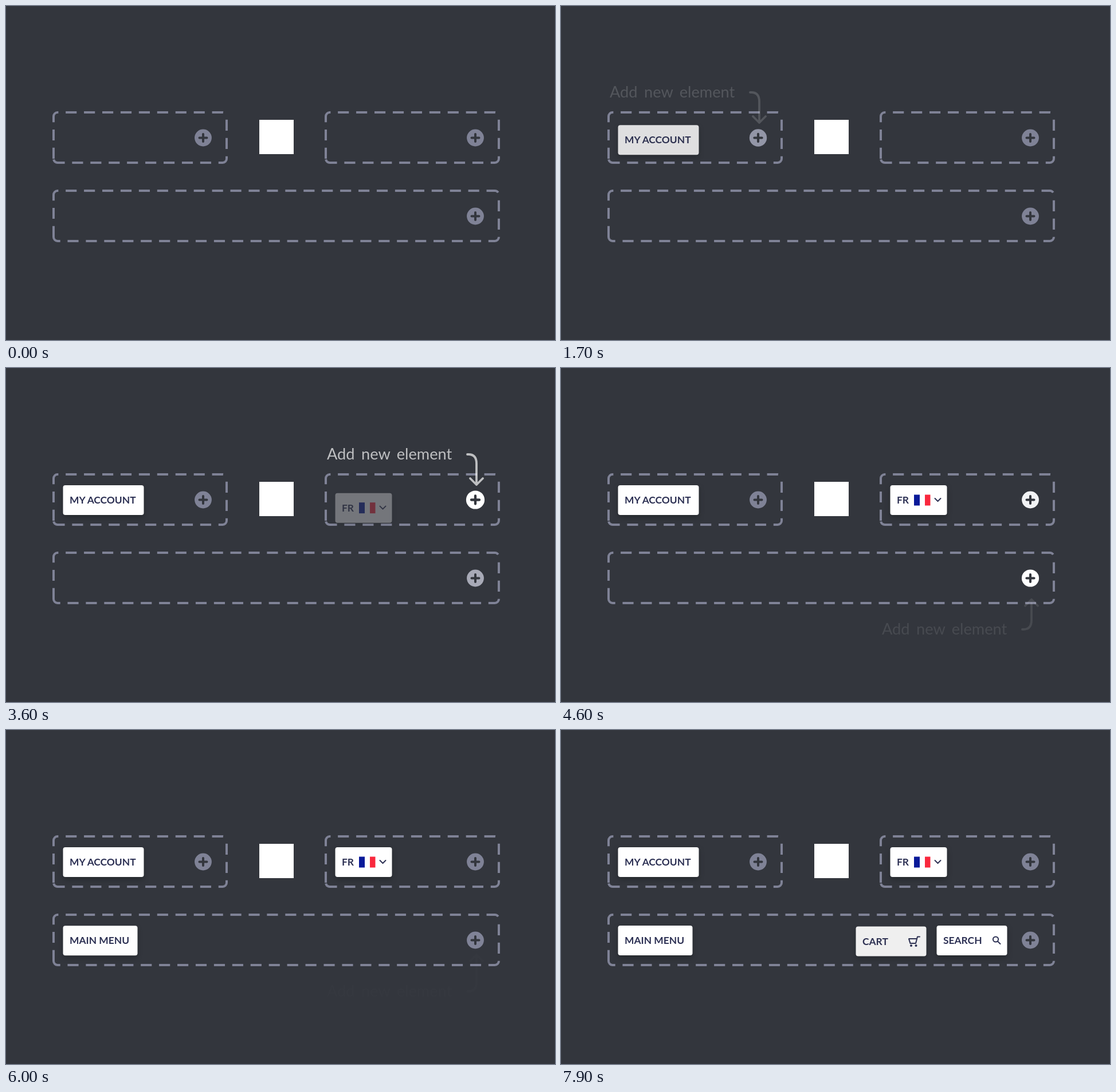
An HTML page for the animation above (8000 ms loop, 958 by 584 pixels).

```html
<!DOCTYPE html>
<html lang="en">
<head>
<meta charset="utf-8">
<title>Header builder</title>
<style>
  html, body { margin: 0; width: 100%; height: 100%; overflow: hidden; background: #33363d; }
  svg { display: block; }
  text { font-family: Lato, sans-serif; }
  /* The fill covers the inner half of the stroke, so the dashes lie outside the path. */
  .zone { fill: #33363d; stroke: #7f8296; stroke-width: 8; stroke-dasharray: 19.16 12.77; paint-order: stroke; }
  .hint text { font-size: 27.2px; word-spacing: 4.5px; fill: #fff; }
  .hint path { fill: none; stroke: #fff; stroke-width: 3.8; stroke-linecap: round; stroke-linejoin: round; }
  .cross { stroke: #33363d; stroke-width: 4; stroke-linecap: round; }
  .badge { filter: drop-shadow(0 4px 5px rgba(20, 24, 26, .45)); }
  .badge text { font-size: 17.4px; font-weight: 700; fill: #2d3154; }
  .line { fill: none; stroke: #2d3154; stroke-width: 2; stroke-linecap: round; stroke-linejoin: round; }
</style>
</head>
<body>
<svg id="stage" width="958" height="584" viewBox="0 0 958 584"></svg>
<script>
const stage = document.getElementById('stage');

function add(markup) {
  stage.insertAdjacentHTML('beforeend', markup);
  return stage.lastElementChild;
}

// Dashes run clockwise from just above the bottom left corner.
function zone(x, y, w) {
  const r = 5, h = 84, arc = (dx, dy) => `a${r} ${r} 0 0 1 ${dx} ${dy}`;
  add(`<path class="zone" d="M${x} ${y + h - r}v${2 * r - h}${arc(r, -r)}h${w - 2 * r}${arc(r, r)}` +
      `v${h - 2 * r}${arc(-r, r)}h${2 * r - w}${arc(-r, -r)}"/>`);
}

function plus(x, y) {
  const group = add(`<g><circle r="14.9"/><path class="cross" d="M-6.5 0h13M0 -6.5v13"/></g>`);
  return (lit, grow) => {
    const mix = from => Math.round(from + (255 - from) * lit);
    group.firstElementChild.setAttribute('fill', `rgb(${mix(127)},${mix(130)},${mix(150)})`);
    group.setAttribute('transform', `translate(${x} ${y}) scale(${1 + 0.12 * grow})`);
  };
}

// dir is 1 for an arrow pointing down and -1 for one pointing up.
function hint(x, baseline, tailY, tipY, dir, slide) {
  const group = add(`<g class="hint"><text x="${x}" y="${baseline}">Add new element</text><path/></g>`);
  const arrow = group.lastElementChild, ax = x + 261, bendY = tailY + 16 * dir;
  return (enter, leave) => {
    let tip = tipY - dir * slide * (1 - enter);
    if ((tip - bendY) * dir < 1) tip = bendY + dir;
    arrow.setAttribute('d', `M${ax - 16} ${tailY}h2Q${ax} ${tailY} ${ax} ${bendY}V${tip}` +
      `M${ax - 11} ${tip - 11 * dir}L${ax} ${tip}l11 ${-11 * dir}`);
    group.setAttribute('opacity', enter - leave);
  };
}

function badge(x, y, w, label, extra = '') {
  const group = add(`<g class="badge"><rect x="${x}" y="${y}" width="${w}" height="52" rx="4" fill="#fff"/>
    <text x="${x + 11.5}" y="${y + 32}">${label}</text>${extra}</g>`);
  return p => {
    group.setAttribute('opacity', p);
    group.setAttribute('transform', `translate(0 ${20 * (1 - p)})`);
  };
}

zone(85, 188, 298);
zone(560, 188, 298);
zone(85, 325, 773);
add('<rect x="442" y="199" width="60" height="60" fill="#fff"/>');

const plusLeft = plus(344, 230.5), plusRight = plus(819, 230.5), plusBottom = plus(819, 367.5);

const account = badge(99.5, 205, 141, 'MY ACCOUNT');
const language = badge(574.5, 205, 99, 'FR',
  `<path fill="#0a1a99" d="M616 221.500h10v19h-10z"/><path fill="#f9283d" d="M635 221.500h9.500v19h-9.500z"/>
   <path class="line" d="M652.500 228l5 5 5-5"/>`);
const menu = badge(99.5, 342, 130, 'MAIN MENU');
const search = badge(655.5, 342, 123, 'SEARCH',
  '<circle class="line" cx="758.5" cy="366" r="4.6"/><path class="line" d="M762 369.500l4.500 4.500"/>');
const cart = badge(514.5, 342, 123, 'CART',
  `<path class="line" d="M626 360h-4l-3 11.500h-9.500l-2.500-8h13.500"/>
   <g fill="#2d3154"><circle cx="611" cy="375.500" r="2"/><circle cx="619.500" cy="375.500" r="2"/></g>`);

const hintLeft = hint(85, 160, 151, 204, 1, 54);
const hintRight = hint(560, 160, 151, 204, 1, 54);
const hintBottom = hint(560, 466, 457, 393, -1, 13);

const LOOP = 8000, TICK = 100, DURATION = 500;
const starts = [440, 1470, 2500, 3540, 4583, 5595, 6605, 7615];

function render(ms) {
  // The picture advances ten times a second.
  const time = Math.floor(ms % LOOP / TICK) * TICK;
  const p = starts.map(start => {
    const t = Math.min(1, Math.max(0, (time - start) / DURATION));
    return 1 - (1 - t) ** 3;
  });
  const quick = v => Math.min(1, 2 * v);

  hintLeft(p[0], p[1]);
  hintRight(p[2], p[3]);
  hintBottom(p[4], p[5]);
  plusLeft(p[0] - p[1], quick(p[0]) - p[1]);
  plusRight(p[2] - p[4], quick(p[2]) - p[3]);
  plusBottom(p[3] - p[5], p[4] - p[5]);
  account(p[1]);
  language(p[3]);
  menu(p[5]);
  search(p[6]);
  cart(p[7]);
}

const begin = performance.now();
function loop() {
  render(performance.now() - begin);
  requestAnimationFrame(loop);
}
loop();
</script>
</body>
</html>
```
